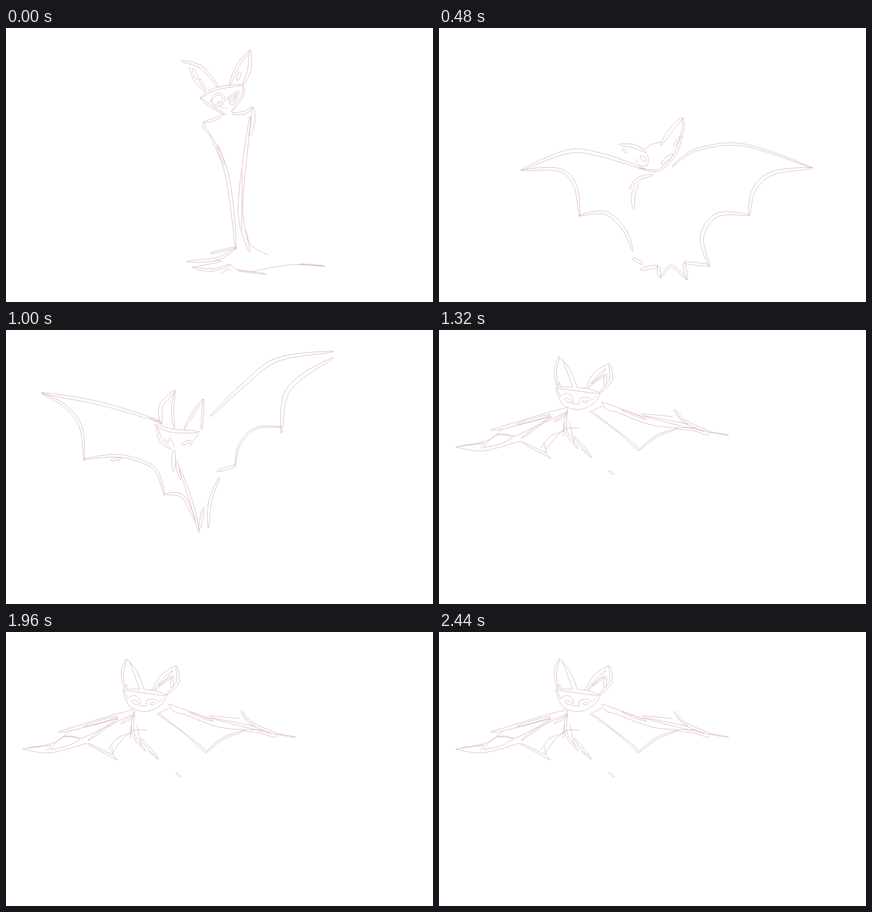
An HTML page with a canvas that plays this animation: 895 by 576 pixels, repeating every 2.52 s.

```html
<!DOCTYPE html>
<html>
<head>
<meta charset="utf-8">
<title>Bat</title>
<style>
html, body { margin: 0; width: 100%; height: 100%; overflow: hidden; background: #fff; }
canvas { display: block; }
</style>
</head>
<body>
<canvas id="stage" width="895" height="576"></canvas>
<script>
const LOOP = 2520, FLIGHT = 1160, STEP = 80, GROUND = 500;
const ctx = document.getElementById('stage').getContext('2d');
let pose;

// Smooth curve through the points; returns position and unit normal at each sample.
function sampleCurve(xy) {
  const last = xy.length / 2 - 1, samples = [];
  const coord = (i, axis) => xy[2 * Math.max(0, Math.min(last, i)) + axis];
  for (let s = 0; s <= last * 12; s++) {
    const i = Math.min(last - 1, Math.floor(s / 12)), u = s / 12 - i;
    const [x, y, vx, vy] = [0, 1, 2, 3].map(n => {
      const [a, b, c, d] = [-1, 0, 1, 2].map(k => coord(i + k, n % 2));
      const q = 2 * a - 5 * b + 4 * c - d, r = 3 * b - a - 3 * c + d;
      return n < 2 ? b + u * (c - a + u * (q + u * r)) / 2 : (c - a + u * (2 * q + 3 * u * r)) / 2;
    });
    const speed = Math.hypot(vx, vy) || 1;
    samples.push({ x, y, nx: -vy / speed, ny: vx / speed, u: s / (last * 12) });
  }
  return samples;
}

function line(...xy) {
  sampleCurve(xy).forEach((p, i) => i ? ctx.lineTo(p.x, p.y) : ctx.moveTo(p.x, p.y));
}

// Outline of a brush stroke with pointed ends.
function brush(width, ...xy) {
  const samples = sampleCurve(xy);
  const edge = side => samples.map(p => {
    const w = side * width / 2 * Math.sin(Math.PI * p.u) ** .5 || 0;
    return [p.x + p.nx * w, p.y + p.ny * w];
  });
  [...edge(1), ...edge(-1).reverse()].forEach(([x, y], i) => i ? ctx.lineTo(x, y) : ctx.moveTo(x, y));
  ctx.closePath();
}

// Following strokes belong to a wing hinged at x = pivot (side -1 or 1) or to the body (side 0).
function limb(side, pivot = 0) {
  const { dx = 0, dy = 0, spread = 1, drop = 0, height = 1 } = pose;
  const k = side ? spread : 1, slope = side * drop;
  ctx.setTransform(k, slope, 0, height, pivot * (1 - k) + dx, dy - slope * pivot + GROUND * (1 - height));
}

function stand() {
  limb(0);
  // ears
  brush(6, 367, 69, 410, 83, 445, 124);
  line(384, 82, 394, 110, 417, 136);
  brush(7, 392, 85, 401, 108);
  brush(5, 405, 106, 418, 132);
  brush(6, 512, 45, 485, 81, 468, 121);
  brush(7, 512, 47, 510, 88, 497, 119);
  brush(7, 491, 92, 485, 110);
  // face
  brush(5, 407, 147, 440, 128, 498, 119);
  brush(4, 407, 147, 430, 165, 460, 182);
  brush(4, 498, 121, 495, 145, 472, 176);
  brush(5, 429, 152, 445, 138, 457, 150, 440, 164, 429, 152);
  line(438, 162, 446, 155, 455, 160, 446, 167);
  brush(5, 465, 147, 486, 135, 475, 159, 465, 147);
  line(470, 151, 483, 141, 478, 152);
  line(450, 172, 457, 167, 464, 171);
  // folded wings
  brush(5, 456, 181, 438, 192, 414, 198);
  brush(5, 415, 198, 416, 210, 427, 223);
  brush(6, 473, 180, 500, 178, 518, 166);
  brush(8, 517, 167, 518, 195, 510, 228);
  brush(7, 427, 222, 458, 290, 473, 370, 482, 466);
  brush(5, 443, 247, 457, 286);
  brush(10, 512, 185, 493, 345, 494, 410, 511, 471);
  line(495, 300, 494, 424);
  line(503, 425, 514, 457, 550, 478);
  // ground
  brush(4, 428, 474, 482, 461);
  brush(6, 482, 464, 440, 486, 378, 491);
  brush(5, 390, 503, 430, 509, 471, 497);
  line(436, 487, 450, 491, 390, 503);
  line(471, 497, 486, 508, 522, 513);
  line(520, 511, 595, 498, 668, 501);
  line(451, 516, 466, 506, 472, 511);
  brush(3, 486, 510, 545, 517);
  brush(2, 616, 496, 668, 500);
}

function leap() {
  limb(-1, 430);
  brush(8, 171, 299, 270, 260, 340, 267, 432, 297);
  brush(7, 172, 299, 250, 298, 285, 330, 295, 397);
  brush(7, 294, 394, 350, 389, 390, 427, 406, 470);
  limb(1, 490);
  brush(5, 489, 291, 540, 256, 640, 246, 783, 294);
  brush(8, 783, 294, 700, 305, 660, 341, 650, 395);
  brush(8, 651, 393, 583, 393, 551, 440, 567, 502);
  brush(6, 567, 499, 513, 493);
  limb(0);
  // ears and face
  brush(7, 378, 245, 410, 249, 434, 261);
  line(434, 262, 439, 276, 436, 290);
  line(430, 257, 445, 245, 466, 240);
  brush(8, 465, 246, 485, 216, 510, 188);
  brush(5, 511, 189, 511, 215, 494, 266, 460, 299, 418, 294);
  brush(5, 508, 226, 492, 249);
  brush(8, 423, 269, 433, 280);
  brush(8, 466, 286, 490, 265);
  brush(4, 384, 254, 393, 262);
  line(410, 275, 420, 288, 436, 290);
  // arm and tail
  brush(6, 449, 309, 420, 316, 399, 337);
  brush(8, 417, 330, 407, 352, 408, 380);
  brush(6, 406, 484, 427, 496);
  brush(7, 422, 508, 459, 500);
  brush(6, 459, 499, 463, 525);
  brush(5, 464, 525, 488, 501, 520, 529);
  brush(6, 520, 529, 513, 493);
}

function climb() {
  limb(-1, 322);
  brush(7, 74, 132, 200, 155, 325, 193);
  brush(6, 75, 133, 125, 161, 157, 205, 164, 275);
  brush(6, 164, 271, 240, 265, 310, 290, 332, 348);
  brush(6, 332, 345, 370, 350, 397, 402);
  brush(5, 220, 274, 243, 269);
  limb(1, 428);
  brush(8, 428, 182, 500, 113, 570, 62, 687, 45);
  brush(9, 687, 58, 620, 98, 585, 140, 577, 217);
  brush(4, 578, 204, 525, 206, 490, 240, 480, 286);
  brush(6, 481, 285, 442, 297);
  limb(0);
  brush(6, 424, 416, 428, 360, 447, 310);
  brush(8, 352, 252, 351, 297);
  brush(6, 357, 275, 366, 314);
  brush(6, 363, 291, 385, 350, 405, 426);
  brush(6, 405, 420, 414, 373);
  // ears and face
  brush(8, 355, 126, 325, 160, 326, 198);
  brush(5, 354, 128, 349, 168, 353, 207);
  brush(5, 414, 145, 395, 170, 373, 209);
  brush(4, 414, 145, 410, 210);
  brush(7, 311, 199, 350, 212, 405, 214);
  brush(6, 316, 202, 325, 232, 346, 250);
  line(331, 229, 340, 236, 344, 226, 353, 246);
  brush(6, 368, 240, 388, 233);
  line(404, 217, 389, 238, 386, 246);
  brush(4, 302, 184, 328, 198);
}

function glide() {
  limb(-1, 270);
  line(268, 163, 212, 178, 109, 210);
  line(109, 210, 134, 208, 235, 182);
  brush(5, 163, 198, 234, 178);
  brush(4, 172, 228, 235, 182);
  line(161, 223, 205, 202, 268, 172);
  line(134, 208, 100, 233, 46, 243);
  line(35, 246, 92, 254, 168, 234);
  line(35, 246, 94, 238);
  line(94, 238, 86, 250);
  line(92, 248, 118, 222, 161, 223);
  line(94, 247, 130, 239, 155, 226);
  line(155, 226, 140, 219, 122, 219);
  line(168, 234, 234, 270);
  line(234, 270, 226, 250, 262, 210, 295, 206);
  line(172, 233, 223, 258);
  line(223, 258, 222, 240);
  line(214, 248, 232, 224, 262, 212);
  limb(1, 340);
  line(341, 151, 385, 167, 430, 184);
  line(341, 151, 350, 166, 374, 173);
  line(374, 173, 452, 201, 540, 206);
  line(430, 181, 480, 195, 556, 213);
  line(342, 160, 317, 172);
  line(317, 172, 375, 215, 419, 255);
  line(322, 172, 405, 236, 418, 250);
  brush(4, 419, 253, 455, 224, 500, 207);
  line(500, 209, 533, 212, 562, 221, 567, 215);
  brush(4, 383, 168, 435, 188);
  line(425, 176, 490, 182);
  line(425, 179, 522, 198);
  line(522, 198, 497, 177);
  brush(6, 493, 167, 518, 194, 570, 215);
  brush(2, 570, 215, 607, 221);
  limb(0);
  // body
  brush(5, 269, 166, 266, 212, 292, 250);
  line(274, 195, 284, 240);
  brush(5, 283, 224, 319, 267);
  line(298, 250, 319, 268);
  brush(4, 241, 193, 270, 175);
  line(260, 224, 262, 195);
  brush(3, 356, 296, 367, 304);
  // ears
  brush(5, 252, 57, 244, 85, 249, 121);
  line(252, 56, 274, 82, 290, 121);
  line(259, 62, 280, 120);
  line(280, 120, 254, 120);
  line(254, 120, 253, 110, 249, 118);
  line(305, 123, 326, 90, 356, 70);
  brush(6, 357, 71, 360, 105, 336, 132);
  brush(5, 312, 122, 349, 81);
  brush(4, 320, 112, 347, 95);
  brush(6, 350, 92, 347, 118);
  // face
  line(244, 122, 334, 134);
  line(290, 121, 315, 124, 338, 133);
  line(244, 122, 260, 157, 295, 167, 325, 153, 338, 133);
  line(248, 124, 255, 140);
  line(255, 140, 268, 133, 281, 143, 280, 155);
  line(280, 155, 294, 156);
  line(294, 156, 296, 144, 312, 142, 320, 148);
  line(320, 148, 331, 137);
  brush(8, 264, 145, 278, 151);
  brush(5, 301, 151, 313, 150);
}

const crouch = [1, 1.026, .95, .87, .8];
const takeoff = [
  { at: 400, sketch: leap, spread: .3, drop: .2 },
  { at: 440, sketch: leap, spread: .65, drop: .1 },
  { at: 480, sketch: leap },
  { at: 520, sketch: leap, dx: -5, dy: -4, spread: .96, drop: -.4 },
  { at: 560, sketch: leap, dx: -12, dy: -8, spread: .88, drop: -.75 },
  { at: 600, sketch: leap, dx: -20, dy: -16, spread: .94, drop: -.3 },
  { at: 680, sketch: leap, dx: -32, dy: -40, spread: .95, drop: .3 },
  { at: 760, sketch: leap, dx: -48, dy: -60, spread: .9, drop: .4 },
  { at: 840, sketch: climb, dx: 50, dy: 40, spread: .95, drop: .45 },
  { at: 920, sketch: climb, dx: 25, dy: 20, drop: .2 },
  { at: 1000, sketch: climb },
  { at: 1080, sketch: climb, dx: -35, dy: -40, spread: .95, drop: .35 }
];
// Wing beat: level, up, level, down
const level = { sketch: glide };
const beat = [
  level, { sketch: glide, dy: 42, spread: .85, drop: -1.1 },
  level, { sketch: glide, dy: -14, spread: 1.07, drop: .36 }
];

function poseAt(t) {
  if (t >= FLIGHT) return beat[Math.floor((t - FLIGHT) / STEP) % 4];
  if (t >= takeoff[0].at) return takeoff.findLast(p => p.at <= t);
  return { sketch: stand, height: crouch[Math.floor(t / STEP)] };
}

const start = performance.now();
function tick() {
  pose = poseAt(Math.max(0, performance.now() - start) % LOOP);
  ctx.clearRect(0, 0, 895, 576);
  ctx.beginPath();
  pose.sketch();
  ctx.resetTransform();
  ctx.strokeStyle = '#cfa3b8';
  ctx.lineWidth = .85;
  ctx.stroke();
  requestAnimationFrame(tick);
}
tick();
</script>
</body>
</html>
```
